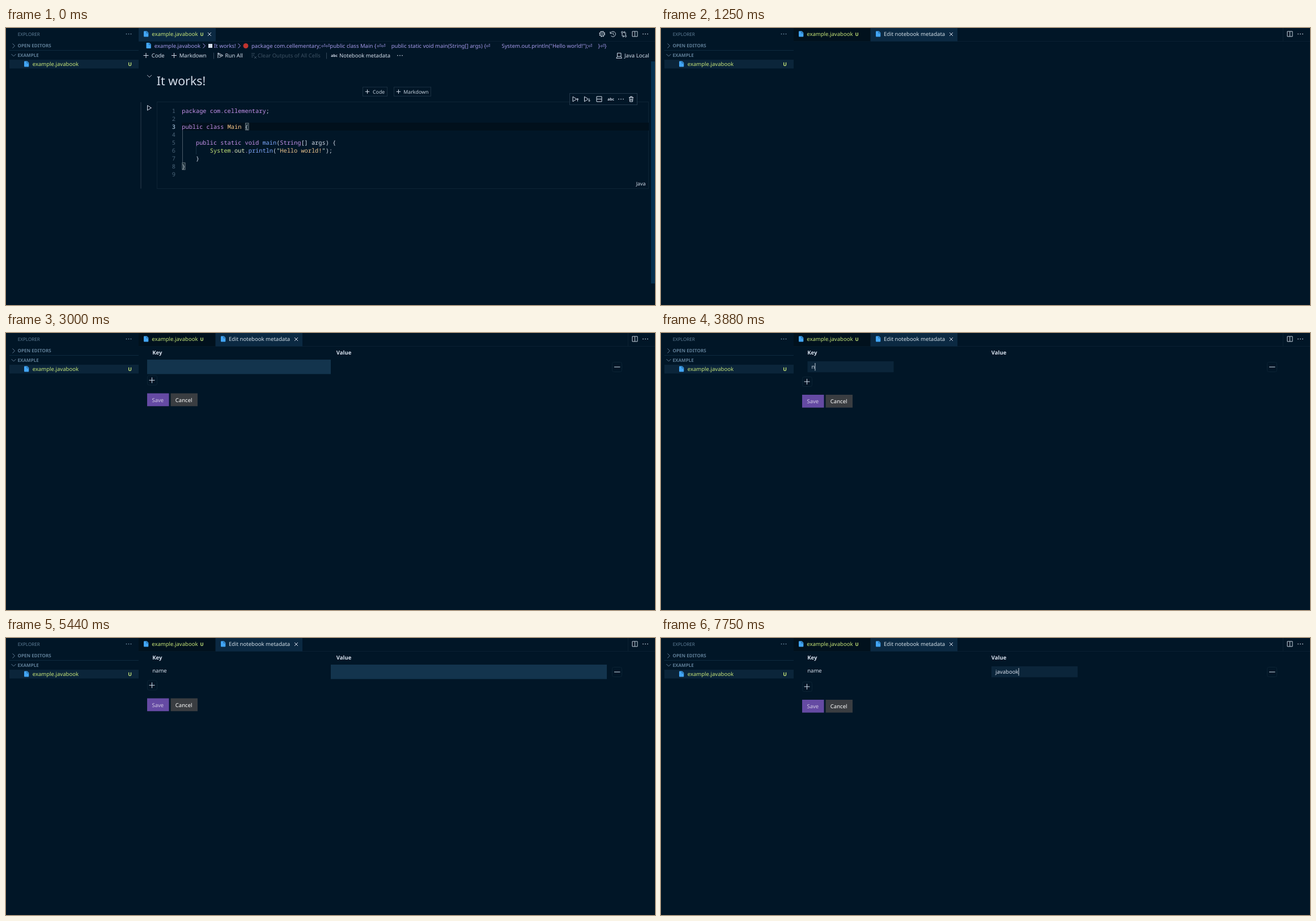
These frames come from a looping animation (1145x489 px, 8 s). An HTML page:

```html
<!DOCTYPE html>
<html lang="en">
<head>
<meta charset="utf-8">
<title>Notebook metadata</title>
<style>
html, body { margin: 0; width: 100%; height: 100%; overflow: hidden; background: #011627; }
svg { display: block; width: 1145px; height: 489px; }
text { font-family: "Noto Sans", sans-serif; white-space: pre; text-rendering: geometricPrecision; }
.mono { font-family: "Noto Sans Mono", monospace; }
.ret { font-family: "DejaVu Sans", sans-serif; }
</style>
</head>
<body>
<svg id="stage" viewBox="0 0 1145 489" xmlns="http://www.w3.org/2000/svg"></svg>
<script>
const LOOP = 8000;
const UI = 9.56, SMALL = 8.83, TINY = 8.1, CODE = 10.3;
const FG = '#d6deeb', DIM = '#5f7e97', GREEN = '#c5e478', PURPLE = '#c792ea',
  BLUE = '#82aaff', CRUMB = '#a599e9', TAB = '#0b2942', BG = '#011627', FIELD = '#0b253a';

const esc = s => s.replace(/&/g, '&amp;').replace(/</g, '&lt;');
const text = (x, y, s, fill = FG, size = UI, extra = '') =>
  `<text x="${x}" y="${y}" fill="${fill}" font-size="${size}" ${extra}>${esc(s)}</text>`;
const bold = (x, y, s, fill, size) => text(x, y, s, fill, size, 'font-weight="700"');
const rect = (x, y, w, h, fill, extra = '') =>
  `<rect x="${x}" y="${y}" width="${w}" height="${h}" fill="${fill}" ${extra}/>`;
const frame = (x, y, w, h, stroke, fill = 'none', rx = 0) =>
  rect(x, y, w, h, fill, `stroke="${stroke}" rx="${rx}"`);
const path = (d, stroke = FG, width = 1, fill = 'none') =>
  `<path d="${d}" stroke="${stroke}" stroke-width="${width}" fill="${fill}"/>`;
const at = (x, y, body, opacity = 1) =>
  `<g transform="translate(${x} ${y})" opacity="${opacity}">${body}</g>`;

const plus = (x, y, r = 4.5, c = FG) => path(`M${x - r} ${y}h${2 * r}M${x} ${y - r}v${2 * r}`, c);
const cross = (x, y) => path(`M${x - 3} ${y - 3}l6 6m0 -6l-6 6`);
const right = (x, y, c) => path(`M${x - 2} ${y - 4}l4 4l-4 4`, c);
const down = (x, y, c) => path(`M${x - 4} ${y - 2}l4 4l4 -4`, c);
const dots = (x, y, c = FG) =>
  [-4, 0, 4].map(d => `<circle cx="${x + d}" cy="${y}" r=".85" fill="${c}"/>`).join('');
const fileIcon = (x, y) =>
  path(`M${x + 1} ${y}h4.5l2.8 2.8v6.2q0 1 -1 1h-6.3q-1 0 -1 -1v-8q0 -1 1 -1z`, 'none', 0, '#42a5f5') +
  path(`M${x + 5} ${y + .7}v2.7h2.7`, '#0b3a60', .7);
const split = (x, y) => path(`M${x - 4.5} ${y - 4.5}h9v9h-9zM${x} ${y - 4.5}v9`, '#c5cfda');
const play = (x, y, c = FG) => path(`M${x - 3} ${y - 4.3}l6.8 4.3l-6.8 4.3z`, c);

function sidebar() {
  return text(20.7, 13.6, 'EXPLORER', DIM, TINY) + dots(216.5, 10.5, '#89a4bb') +
    right(13.5, 31.5, DIM) + bold(20.5, 34.4, 'OPEN EDITORS', DIM, TINY) +
    rect(6, 39, 228, 1, '#0d2a3e') +
    down(13.5, 48, DIM) + bold(20.5, 51, 'EXAMPLE', DIM, TINY) +
    rect(6, 56, 228, 15.5, FIELD) + fileIcon(32, 58.5) +
    text(46.7, 67.2, 'example.javabook', GREEN) + text(215.3, 67, 'U', GREEN, SMALL, 'font-weight="600"');
}

function tabs(editing) {
  let s = rect(234, 23, 911, 1, '#0a2032');
  s += rect(234, 0, 136, 23.5, editing ? '#01111d' : TAB) + fileIcon(243, 5.5) +
    text(257.2, 14, 'example.javabook', GREEN) + text(342.6, 13.8, 'U', GREEN, TINY, 'font-weight="600"');
  if (editing) {
    s += rect(369.5, 0, 153.5, 23.5, TAB) + fileIcon(379, 5.5) +
      text(393, 14, 'Edit notebook metadata', '#d2dee7') + cross(512, 11) +
      rect(1097, 0, 1, 23, '#0a2032');
  } else {
    s += cross(359, 11) + gear(1051.7, 10.5) + history(1070.5, 10.5) + compare(1090, 11);
  }
  return s + split(1109.5, 10.5) + dots(1128, 10.5);
}

const gear = (x, y) => `<circle cx="${x}" cy="${y}" r="4.6" fill="none" stroke="#c5cfda" stroke-width="1.5" stroke-dasharray="2.2 1.41"/>` +
  `<circle cx="${x}" cy="${y}" r="3.7" fill="none" stroke="#c5cfda" stroke-width=".9"/><circle cx="${x}" cy="${y}" r="1.4" fill="none" stroke="#c5cfda" stroke-width=".9"/>`;
const history = (x, y) => path(`M${x - 4.5} ${y - 4}v3.2h3.2M${x - 4} ${y - 1.2}a4.6 4.6 0 1 1 1 4.6M${x + .5} ${y - 2.4}v2.8l2 1.6`, '#c5cfda');
const compare = (x, y) => `<circle cx="${x - 3}" cy="${y - 3.5}" r="1.4" fill="none" stroke="#c5cfda"/>` +
  `<circle cx="${x + 3.2}" cy="${y + 3.5}" r="1.4" fill="none" stroke="#c5cfda"/>` +
  path(`M${x - 3} ${y - 2}v4.6q0 1 1 1h2.4M${x - 1.6} ${y + 1.6}l2 2l-2 2M${x + 3.2} ${y + 2}v-4.6q0 -1 -1 -1h-2.4M${x + 1.6} ${y - 5.4}l-2 2l2 2`, '#c5cfda');

function breadcrumbs() {
  const parts = [[433, 'package com.cellementary;'], [571.3, 'public class Main {'],
    [679.7, 'public static void main(String[] args) {'],
    [874.5, 'System.out.println("Hello world!");'], [1044.5, '}'], [1056, '}']];
  const returns = [555.7, 563.5, 654, 661.8, 846.6, 1026.6, 1048.2];
  return fileIcon(247.5, 26) + text(261.8, 34.6, 'example.javabook', CRUMB) + right(349.5, 31.5, CRUMB) +
    rect(357, 28, 7, 7, FG) + text(367, 34.6, 'It works!', CRUMB) + right(411.5, 31.5, CRUMB) +
    '<circle cx="423" cy="31.5" r="4.5" fill="#c0342f"/>' +
    parts.map(([x, s]) => text(x, 34.6, s, CRUMB)).join('') +
    returns.map(x => text(x, 34.6, '⏎', CRUMB, UI, 'class="ret"')).join('');
}

function toolbar(hover) {
  const off = '#3d5163', y = 52.2;
  return (hover ? rect(572, 41, 110, 15, '#1b2d3c', 'rx="3"') : '') +
    plus(247, 48.5) + text(256.7, y, 'Code') + plus(296.5, 48.5) + text(305.7, y, 'Markdown') +
    rect(366, 43.5, 1, 11, '#33475a') +
    path('M374 53v-9l9 4.5l-7 3.6M374 44l3 4.5h3') + text(386.6, y, 'Run All') +
    path('M433 45h6M433 48h5M433 51h3M438 50l4 4m0 -4l-4 4', off) +
    text(444, y, 'Clear Outputs of All Cells', off) +
    rect(565, 43.5, 1, 11, '#33475a') +
    bold(573.3, 51, 'abc', FG, 6.6) + text(588, y, 'Notebook metadata') + dots(695, 48.5) +
    path('M1078.5 44.3h6.5v6h-6.5zM1076.8 53.3h9.6l-1.4 -3M1078.5 50.3l-1.7 3', FG) +
    text(1091, y, 'Java Local');
}

function insertBar(y, opacity) {
  if (opacity <= 0) return '';
  const line = '#1a2f40';
  return at(0, y, frame(629.5, -7.7, 43, 16, line) + plus(637.5, .3, 3.7) + text(647, 3.6, 'Code', '#c6d0dc', SMALL) +
    frame(684.5, -7.7, 65, 16, line) + plus(692.5, .3, 3.7) + text(701.2, 3.6, 'Markdown', '#c6d0dc', SMALL), opacity);
}

// Each line is a list of [column, colour, text].
const LINES = [
  [[0, PURPLE, 'package com.cellementary'], [24, FG, ';']], [],
  [[0, PURPLE, 'public class'], [13, '#ffcb8b', 'Main'], [18, FG, '{']], [],
  [[4, PURPLE, 'public static void'], [23, BLUE, 'main'], [27, FG, '('], [28, PURPLE, 'String'], [34, FG, '[] args) {']],
  [[8, GREEN, 'System'], [14, PURPLE, '.'], [15, '#e3ecc0', 'out'], [18, PURPLE, '.'], [19, BLUE, 'println'],
    [26, FG, '('], [27, '#d9f5dd', '"'], [28, '#ecc48d', 'Hello world!'], [40, '#d9f5dd', '"'], [41, FG, ');']],
  [[4, FG, '}']], [[0, FG, '}']], []
];

function cell(caret) {
  const col = CODE * .6;
  let s = rect(237, 131, 2, 152.5, '#16293a') + frame(266.5, 130.5, 867, 153, '#0e2435') + play(252.5, 141) +
    rect(310, 167, 824, 14, '#01101c') +
    rect(311, 181, 1, 57, '#4c5b68') + rect(335, 209, 1, 14, '#173044') +
    frame(422.5, 168, 5.5, 12, '#74818a', '#10242f') + frame(311, 238, 5, 12, '#74818a', '#10242f');
  LINES.forEach((line, i) => {
    const y = 149.8 + i * 14;
    s += text(299, y, String(i + 1), i === 2 ? '#c5e4fd' : '#4b6479', CODE, 'class="mono" text-anchor="end"');
    for (const [c, fill, str] of line) s += text((310.3 + c * col).toFixed(2), y, str, fill, CODE, 'class="mono"');
  });
  if (caret) s += rect(428, 167.5, 1.3, 13, '#b8c6d0');
  s += frame(994.5, 115.5, 119, 20, '#23384a', BG) +
    play(1003, 125.5) + path('M1008.5 129.5v-5m-1.7 1.7l1.7 -1.7l1.7 1.7') +
    play(1023.5, 125.5) + path('M1029 124.5v5m-1.7 -1.7l1.7 1.7l1.7 -1.7') +
    path('M1042 121h9v9h-9zM1042 125.5h9') + bold(1061.3, 128, 'abc', FG, 6.6) + dots(1085, 125.5) +
    path('M1099 122.5h8M1101.5 122.5v-1.5h3v1.5M1100 122.5l.5 7.5h5l.5 -7.5M1102 124.5v4M1104 124.5v4');
  return s + text(1111.7, 278, 'Java', FG, SMALL);
}

const ramp = (t, a, b) => Math.min(1, Math.max(0, (t - a) / (b - a)));

function notebook(t) {
  const bar = t < 940 ? 1 : t < 1060 ? .5 : 0;
  return breadcrumbs() + toolbar(t >= 440) +
    (t < 310 ? down(253, 85, '#a3b1c0') : '') +
    text(265.8, 101, 'It works!', FG, 21.4) + cell(t >= 250 && t < 750) +
    insertBar(112, 1 - ramp(t, 60, 250)) + insertBar(70, ramp(t, 250, 440) * (1 - ramp(t, 630, 750))) +
    rect(1138, 59, 7, 392, '#06304f', `opacity="${bar}"`);
}

function input(x, str, caret) {
  const widths = { j: .258, a: .561, v: .508, b: .615, o: .605, k: .534, n: .618, m: .935, e: .564 };
  const end = [...str].reduce((sum, c) => sum + widths[c] * UI, x + 7);
  return rect(x, 50, 152, 19.3, FIELD) + text(x + 7, 63, str) +
    (caret ? rect(end.toFixed(2), 53, 1, 13.5, '#c5d0da') : '');
}

const typed = (word, times, t) => word.slice(0, times.filter(k => t >= k).length);

function form(t) {
  const row = t >= 2440, editKey = t >= 3250 && t < 4440, editValue = t >= 5750;
  const shift = !row ? -26.3 : editKey || editValue ? 2.5 : 0;
  const overPlus = t >= 2250 && t < 3000;
  let s = bold(258.2, 37.8, 'Key', FG, UI) + bold(582.7, 37.8, 'Value', FG, UI);
  if (row) {
    if (t >= 3000 && t < 3250) s += rect(249, 47, 324, 25.5, '#13344d');
    if (t >= 5440 && t < 5750) s += rect(573, 47, 487, 25.5, '#13344d');
    if (editKey) s += input(258.5, typed('name', [3880, 3980, 4090, 4190], t), true);
    if (t >= 4440) s += text(258.2, 60.6, 'name');
    if (editValue) s += input(583, typed('javabook', [6560, 6670, 6770, 6880, 7130, 7560, 7660, 7750], t), t < 6310 || t >= 6560);
    s += frame(1069.5, 51.5, 17, 17, '#0c2334', 'none', 3) + path('M1073 60h10.5');
  }
  return s + at(0, shift,
    frame(249.5, 75, 17, 17, '#0c2334', overPlus ? '#1b2d3c' : 'none', 3) + plus(257.5, 83.4, 5) +
    rect(249, 106.5, 38.5, 22.7, '#654aa3') + text(257.4, 121.6, 'Save', '#d0c8e3') +
    rect(290.5, 106.5, 47.5, 22.7, '#3a3d41') + text(298.8, 121.6, 'Cancel', '#ffffff'));
}

const stage = document.getElementById('stage');
let last = '';
function render(t) {
  const editing = t >= 1250;
  const scene = rect(0, 0, 1145, 489, BG) + sidebar() + tabs(editing) +
    (!editing ? notebook(t) : t >= 1630 ? form(t) : '');
  if (scene !== last) stage.innerHTML = last = scene;
}

const start = performance.now();
function tick() {
  render((performance.now() - start) % LOOP);
  requestAnimationFrame(tick);
}
render(0);
requestAnimationFrame(tick);
</script>
</body>
</html>
```
